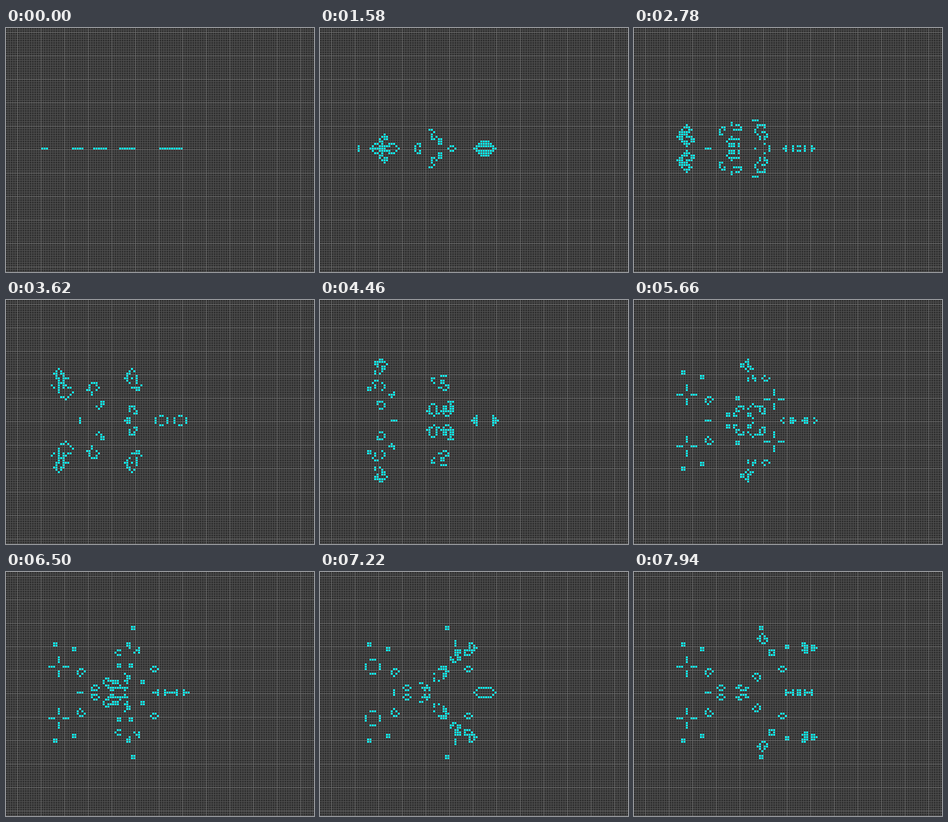
Write an HTML page with a canvas that moves like this. It is 522 px wide and 416 px high and loops after 8 s.

```html
<!DOCTYPE html>
<html lang="en">
<head>
<meta charset="utf-8">
<title>Game of Life</title>
<style>
  html, body { margin: 0; width: 100%; height: 100%; overflow: hidden; background: #303030; }
  canvas { display: block; }
</style>
</head>
<body>
<canvas id="stage" width="522" height="416"></canvas>
<script>
const WIDTH = 522, HEIGHT = 416, CELL = 4;
const COLS = 131, ROWS = 104;
const LOOP = 8000, HOLD = 500, STEP = 60;

const ctx = document.getElementById('stage').getContext('2d');

// Starting rows of live cells: [first column, length]
const START_ROW = 51;
const RUNS = [[15, 3], [28, 5], [37, 6], [48, 7], [65, 10]];

function firstGeneration() {
  const cells = new Uint8Array(COLS * ROWS);
  for (const [col, length] of RUNS) {
    const start = START_ROW * COLS + col;
    cells.fill(1, start, start + length);
  }
  return cells;
}

function nextGeneration(cells) {
  const next = new Uint8Array(cells.length);
  for (let row = 1; row < ROWS - 1; row++) {
    for (let col = 1; col < COLS - 1; col++) {
      const i = row * COLS + col;
      let sum = 0;
      for (const j of [i - COLS, i, i + COLS]) sum += cells[j - 1] + cells[j] + cells[j + 1];
      next[i] = sum === 3 || (sum === 4 && cells[i]) ? 1 : 0;
    }
  }
  return next;
}

// The simulation runs slightly slower than two generations per screen update.
function generationAt(step) {
  return Math.max(step, 2 * step - 4 - Math.floor((step - 4.2) / 10.6));
}

function stepAt(time) {
  return time < HOLD ? 0 : Math.floor((time - HOLD) / STEP) + 1;
}

const generations = [firstGeneration()];
const lastGeneration = generationAt(stepAt(LOOP - 1));
while (generations.length <= lastGeneration) {
  generations.push(nextGeneration(generations[generations.length - 1]));
}

function drawLines(firstX, firstY, spacing, color) {
  ctx.fillStyle = color;
  for (let x = firstX; x < WIDTH; x += spacing) ctx.fillRect(x, 0, 1, HEIGHT);
  for (let y = firstY; y < HEIGHT; y += spacing) ctx.fillRect(0, y, WIDTH, 1);
}

function draw(cells) {
  ctx.fillStyle = '#303030';
  ctx.fillRect(0, 0, WIDTH, HEIGHT);
  drawLines(3, 3, CELL, '#505050');
  drawLines(19, 7, CELL * 10, '#707070');
  ctx.fillStyle = '#00ffff';
  cells.forEach((alive, i) => {
    if (alive) ctx.fillRect(i % COLS * CELL, Math.floor(i / COLS) * CELL, CELL - 1, CELL - 1);
  });
}

const startTime = performance.now();
let shown = -1;

function tick() {
  const time = (performance.now() - startTime) % LOOP;
  const generation = generationAt(stepAt(time));
  if (generation !== shown) {
    shown = generation;
    draw(generations[generation]);
  }
  requestAnimationFrame(tick);
}
tick();
</script>
</body>
</html>
```
